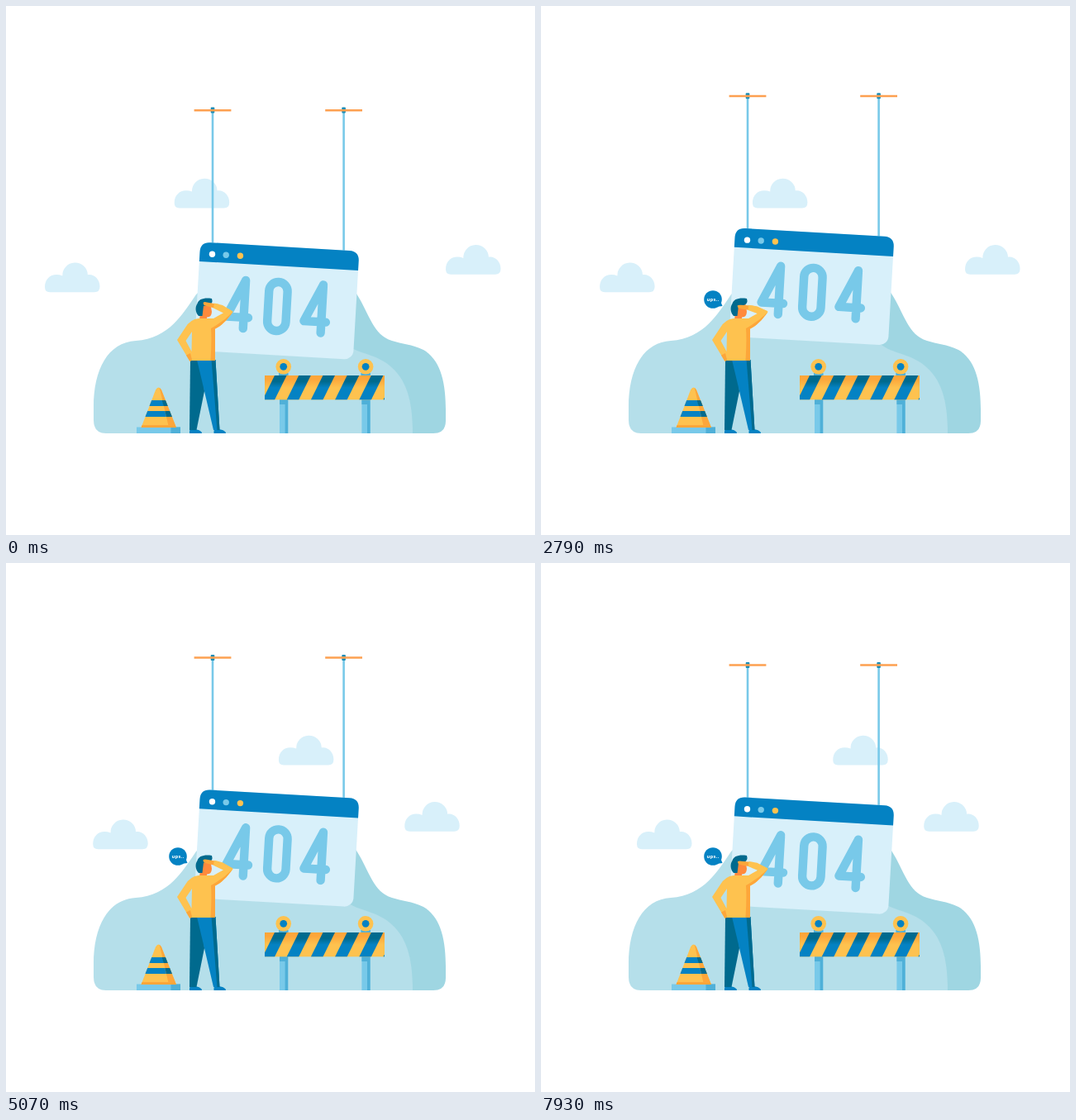
Animation, 640 px wide and 640 px high, one loop 8000 ms. Source, as an HTML page:

```html
<!DOCTYPE html>
<html lang="en">
<head>
<meta charset="utf-8">
<title>404</title>
<style>
html, body { margin: 0; width: 100%; height: 100%; overflow: hidden; background: #fff; }
svg { display: block; width: 100vw; height: 100vh; }
.pale { fill: #d8f0fa; }
.sky { fill: #78c9e9; }
.mid { fill: #4fb0d8; }
.blue { fill: #0482c3; }
.deep { fill: #006a8e; }
.sun { fill: #fec24f; }
.amber { fill: #fda63a; }
.skin { fill: #ff8a3c; }
.digits { fill: none; stroke: #78c9e9; stroke-width: 10.4; stroke-linecap: round; stroke-linejoin: round; }
text { font: 700 6px "Open Sans", sans-serif; fill: #fff; text-anchor: middle; letter-spacing: .2px; }
</style>
</head>
<body>
<svg viewBox="0 0 640 640">
  <defs>
    <path id="cloud" class="pale" d="M6 35.2Q0 35.2 0 29C0 20 6 14 14 14Q18 14 21.3 15.4A15.3 15.3 0 0 1 51.9 14.2C60 13 66.5 20 66.5 28.5Q66.5 35.2 60 35.2Z"/>
    <g id="hook">
      <path d="M0 126V300" stroke="#78c9e9" stroke-width="2.6"/>
      <rect x="-2.3" y="122.5" width="4.6" height="7" rx="1" fill="#1a8cb4"/>
      <path d="M-22.4 126.2H22.4" stroke="#fda050" stroke-width="2.5"/>
    </g>
    <path id="four" d="M57.5 43.2L36.5 88.2H63M57.5 43.2V101.5"/>
    <g id="leg">
      <rect class="sky" x="331" y="476" width="10.2" height="41"/>
      <path class="mid" d="M331 476H341.2V517H337.6V482H331ZM330 444H341.5V448H330Z"/>
      <circle class="sun" cx="335.7" cy="436.3" r="9.3"/>
      <circle class="blue" cx="335.7" cy="436.3" r="4.4"/>
    </g>
    <linearGradient id="bar" x1="0" y1="0" x2="0" y2="1">
      <stop offset=".25" stop-color="#006a8e"/><stop offset=".5" stop-color="#0482c3"/>
    </linearGradient>
    <linearGradient id="board" x1="0" y1="0" x2="0" y2="1">
      <stop offset=".15" stop-color="#fda63a"/><stop offset=".5" stop-color="#fec24f"/>
    </linearGradient>
    <clipPath id="frame"><rect x="313" y="447" width="145" height="29.6"/></clipPath>
    <clipPath id="cone"><path d="M163.5 510L181 464.5Q184.5 458.5 188 464.5L206 510Z"/></clipPath>
  </defs>

  <path fill="#9fd6e2" d="M300 517V330H412L424 348C440 373 444 398 467 405C479 409 491 409 505 416C526 428 532 456 532 488V502Q532 517 517 517Z"/>
  <path fill="#b5dfea" d="M121 517Q106 517 106 501V485C106 440 123 407 157 405C198 402 214 372 230 349L250 330H380L407 405C420 420 437 418 457 430C484 447 492 475 492 517Z"/>

  <use href="#cloud" id="c0"/><use href="#cloud" id="c1"/><use href="#cloud" id="c2"/>

  <g id="sign">
    <use href="#hook" x="250"/><use href="#hook" x="408.6"/>
    <g transform="translate(235.2 285.5) rotate(3.3)">
      <rect class="pale" width="192.5" height="131.5" rx="11"/>
      <path class="blue" d="M0 23.5V12Q0 0 12 0H180.5Q192.5 0 192.5 12V23.5Z"/>
      <g class="digits">
        <use href="#four"/><use href="#four" x="94"/>
        <rect x="86.3" y="43" width="22.4" height="59" rx="11.2"/>
      </g>
    </g>
    <circle cx="249.5" cy="300.3" r="3.7" fill="#fff"/>
    <circle class="sky" cx="266.2" cy="301.2" r="3.7"/>
    <circle class="sun" cx="283.4" cy="302.2" r="3.7"/>
  </g>

  <g id="cones">
    <rect class="sky" x="158" y="509.5" width="53" height="7.5"/>
    <rect class="mid" x="199.5" y="509.5" width="11.5" height="7.5"/>
    <g clip-path="url(#cone)">
      <rect class="sun" x="160" y="459" width="50" height="51"/>
      <path class="blue" d="M160 477H210V484H160ZM160 490H210V497H160Z"/>
      <path class="amber" d="M185 459H210V510H197ZM160 507H210V510H160Z"/>
      <path class="deep" d="M188.7 477H210V484H190.6ZM192.3 490H210V497H194Z"/>
    </g>
  </g>

  <use href="#leg"/><use href="#leg" x="99.4"/>
  <g clip-path="url(#frame)">
    <rect x="313" y="447" width="145" height="29.6" fill="url(#board)"/>
    <g id="stripes" fill="url(#bar)"></g>
  </g>

  <g id="man">
    <path class="blue" d="M222 517V513.5Q226 511 231 512.5Q237 514 237 517ZM251.500 517V513.500Q255 511 260 512.500Q266 514 266 517Z"/>
    <path class="deep" d="M223 428H238L240 466L230.500 513H222Z"/>
    <path class="blue" d="M231 428H253.500L258.500 513H251L240 466Z"/>
    <path class="deep" d="M248.500 428H253.500L258.500 513H255.500Z"/>
    <path class="skin" d="M235 370L237 361H247.500L249 370Q248.500 377 243 376.500V380H234Z"/>
    <path class="deep" d="M231.500 360C233 354.500 240 352.500 249 354Q251 360 245.500 362L239 363L237.500 375L233 375C229 371 228.500 364 231.500 360Z"/>
    <path class="sun" d="M233 378H251L270 367.500L274.500 370C267 381 259 388 253 390.500V429H224L222.500 430L207 404L217 389Q223 379 233 378ZM225 394L217.500 405L224.500 418Z" fill-rule="evenodd"/>
    <path class="amber" d="M274.500 370C267 381 259 388 253 390.500V429H247.500Q249 405 248 390Q263 382 274.500 370Z"/>
    <path class="amber" d="M222.500 430L218 422.500L223 420L225 428Z"/>
    <g id="arm">
      <path class="amber" d="M238.500 359Q240 357.500 243 358.500L258 361V367L246 364L239.500 362Z"/>
      <path class="sun" d="M252 359.500L262 362L274.500 369.500L269 374.500L251 365.500Z"/>
    </g>
  </g>

  <g id="bubble">
    <circle class="blue" cx="208" cy="355" r="10.8"/>
    <path class="blue" d="M212 364L219.500 363L217.500 358Z"/>
    <text x="208" y="357">ups..</text>
  </g>
</svg>
<script>
const LOOP = 8000, SWING = 7080, ARM = 4600;
const $ = id => document.getElementById(id);
const set = (id, v) => $(id).setAttribute('transform', v);
const wave = p => (1 - Math.cos(Math.PI * p)) / 2;

for (let i = 0; i < 6; i++) {
  const x = 325 + i * 29.2;
  $('stripes').innerHTML += `<path d="M${x} 447h14.6l-14.6 29.600h-14.600Z"/>`;
}

function draw(t) {
  const p = t / SWING;
  const q = t / 7400;
  const late = q - 0.34 * q * q * (1 - q);
  set('sign', `translate(0 ${-19.2 * wave(2 * p)})`);
  set('c0', `translate(${47 + 71.5 * wave(p)} 311)`);
  set('c1', `translate(${203.700 + 155 * wave(p)} 209.200)`);
  set('c2', `translate(${532 - 70.5 * wave(late)} 289.500)`);
  set('arm', `rotate(${-7 * wave(2 * t / ARM)} 273 370)`);
  const k = Math.min(1, Math.max(0, (t - 1500) / 400));
  const s = 1 - (1 - k) ** 1.5;
  set('bubble', `translate(219 362.500) scale(${s}) translate(-219 -362.500)`);
}

const start = performance.now();
function tick() {
  draw((performance.now() - start) % LOOP);
  requestAnimationFrame(tick);
}
draw(0);
tick();
</script>
</body>
</html>
```
